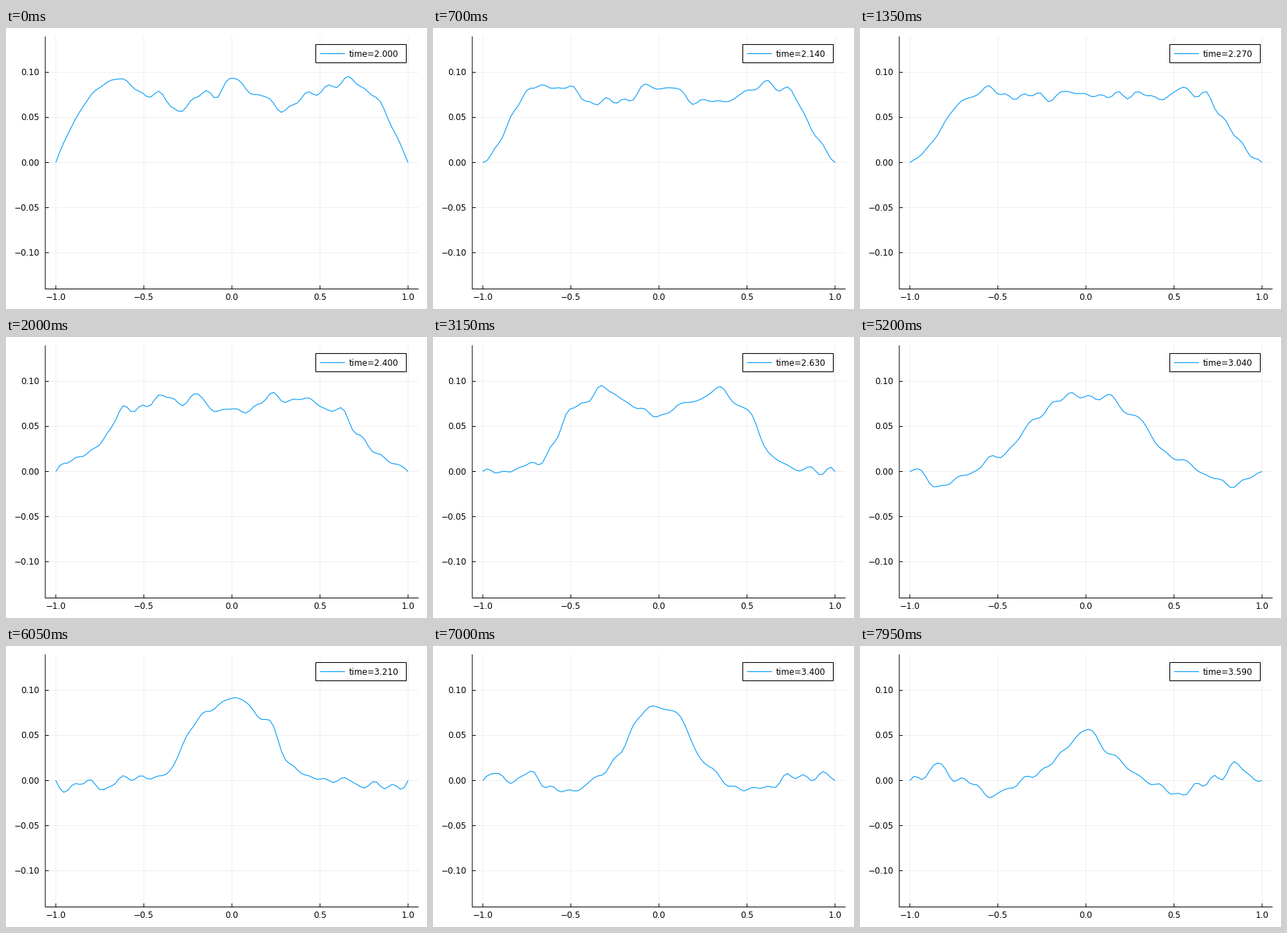
A matplotlib script that plays this animation: 600x400 px, repeating every 8 s.

```python
import numpy as np
import matplotlib.pyplot as plt
from matplotlib.animation import FuncAnimation

W, H, DPI = 600, 400, 100
PT = 72 / DPI                      # one pixel in points
FRAMES, INTERVAL = 160, 50
T0, DT = 2.0, 0.01
SPEED = 0.53                       # wave speed along the string
PLATEAU = 0.076
LINKS = 89
BLUE = "#009afa"
GRID = "#eeeeee"
FONT = dict(family="DejaVu Sans", size=11.9 * PT, color="black")

# Bumps present at T0, mirrored about the centre: position, height, width
BUMPS = [(0, 0.018, 0.06), (0.30, -0.018, 0.08), (0.66, 0.018, 0.11)]

xs = np.linspace(-1, 1, LINKS + 1)
times = T0 + DT * np.arange(FRAMES)


def px(x):
    return 322 + 251 * np.asarray(x)


def py(y):
    return 191.5 - 1283 * np.asarray(y)


def soft_square(s):
    return np.tanh(np.sin(np.pi * s / 2) / 0.18)


def struck(t):
    """A string struck at its centre: the plateau spreads, then shrinks."""
    s = SPEED * t
    return PLATEAU / 2 * (soft_square(xs + s) - soft_square(xs - s))


def bump_profile(s):
    s = np.abs((s + 2) % 4 - 2)
    return sum(a * np.exp(-((s - x0) / w) ** 2) for x0, a, w in BUMPS)


def bumps(t):
    """Each bump splits in two and flips over at the fixed ends."""
    def ring(s):
        return bump_profile(s) - bump_profile(s - 2)

    s = SPEED * (t - T0)
    return (ring(xs + s) + ring(xs - s)) / 2


rng = np.random.default_rng(4)
modes = np.arange(10, 46)
phases = rng.uniform(0, 2 * np.pi, len(modes))
omegas = SPEED * LINKS * np.sin(modes * np.pi / (2 * LINKS))
shapes = np.sin(np.outer(modes, xs + 1) * np.pi / 2)


def ripple(t):
    """Fine jitter: short waves running on a chain of masses."""
    return 0.0008 * np.cos(omegas * t + phases) @ shapes


def height(t):
    return struck(t) + bumps(t) + ripple(t)


fig = plt.figure(figsize=(W / DPI, H / DPI), dpi=DPI, facecolor="white")
ax = fig.add_axes([0, 0, 1, 1])
ax.set_xlim(0, W)
ax.set_ylim(H, 0)
ax.axis("off")

LEFT, RIGHT, TOP, BOTTOM = 56, 588, 12, 371.5


def stroke(x, y, color="black", width=1.0, z=3):
    return ax.plot(x, y, color=color, lw=width * PT, zorder=z, snap=False,
                   solid_capstyle="butt", solid_joinstyle="round")[0]


def tick_label(value, digits):
    return f"{value:.{digits}f}".replace("-", "\u2212")


for x in np.linspace(-1, 1, 5):
    p = px(x)
    stroke([p, p], [TOP, BOTTOM], GRID, z=1)
    stroke([p, p], [BOTTOM, BOTTOM - 5])
    ax.text(p, 387.2, tick_label(x, 1), ha="center", va="baseline", **FONT)

for y in np.linspace(-0.1, 0.1, 5):
    p = py(y)
    stroke([LEFT, RIGHT], [p, p], GRID, z=1)
    stroke([LEFT, LEFT + 5], [p, p])
    ax.text(48, p + 4, tick_label(y, 2), ha="right", va="baseline", **FONT)

stroke([LEFT, LEFT], [TOP, BOTTOM + 0.5])
stroke([LEFT, RIGHT], [BOTTOM, BOTTOM])

string = stroke(px(xs), py(height(T0)), BLUE, 1.1, 4)

ax.add_patch(plt.Rectangle((441.5, 23.5), 129, 26, facecolor="white",
                           edgecolor="black", lw=1.1 * PT, zorder=5,
                           snap=False))
stroke([447.5, 483], [36.5, 36.5], BLUE, 1.1, 6)
clock = ax.text(488.5, 41.2, "", ha="left", va="baseline", zorder=6, **FONT)


def update(i):
    string.set_ydata(py(height(times[i])))
    clock.set_text(f"time={times[i]:.3f}")
    return string, clock


anim = FuncAnimation(fig, update, frames=FRAMES, interval=INTERVAL,
                     init_func=lambda: update(0), repeat=True, repeat_delay=0)
plt.show()
```
